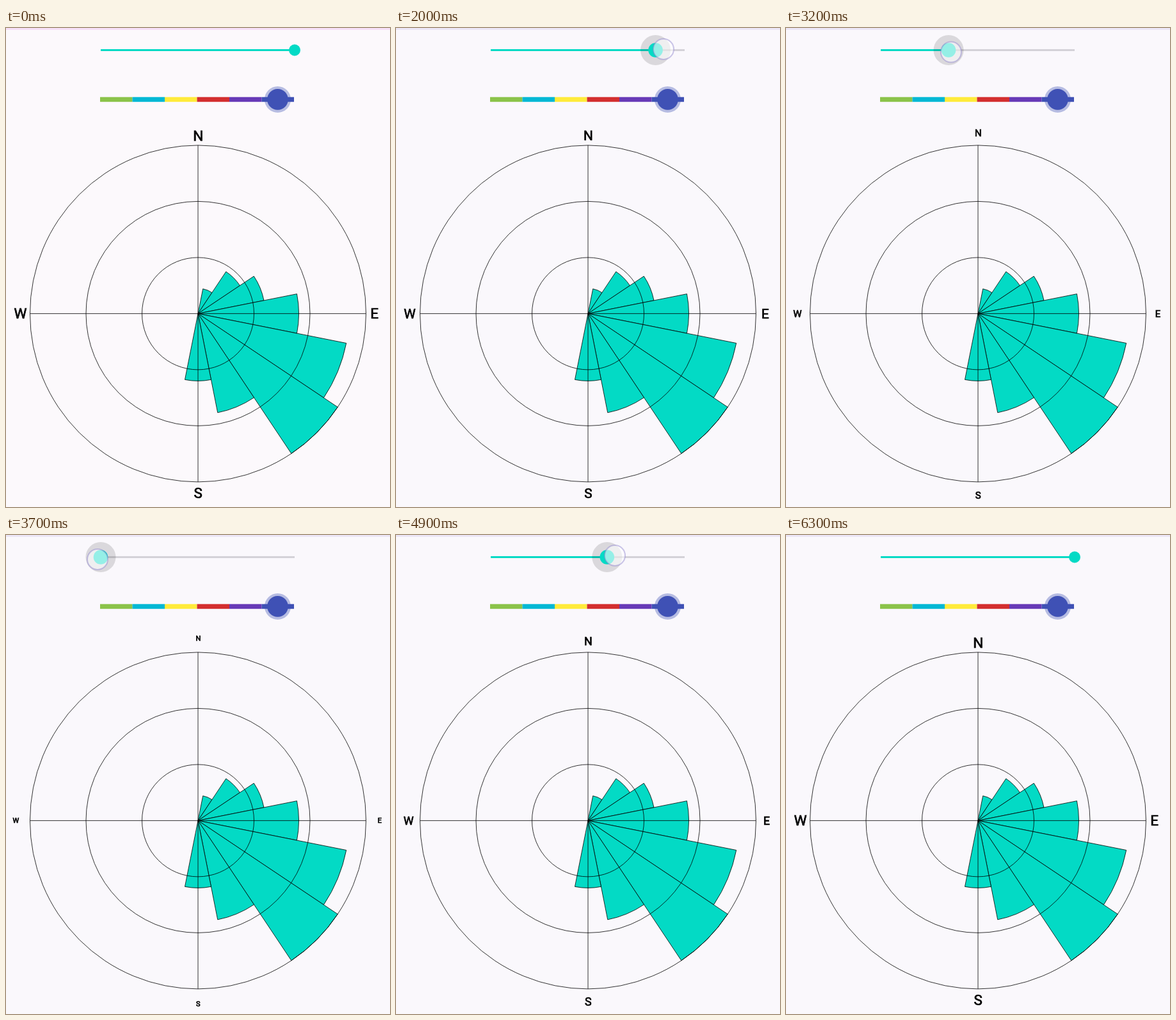
An HTML page with a canvas for the animation above (9000 ms loop, 600x747 px).

```html
<!DOCTYPE html>
<html lang="en">
<head>
<meta charset="utf-8">
<title>Wind rose</title>
<style>
html, body { margin: 0; height: 100%; overflow: hidden; background: #faf8fc; }
canvas { display: block; }
</style>
</head>
<body>
<canvas id="stage" width="600" height="747"></canvas>
<script>
const ctx = document.getElementById('stage').getContext('2d');
const LOOP = 9000, STEP = 100;
const TEAL = '#03dac5';
const CX = 300, CY = 445.4, R = 262.5;
const X0 = 148, X1 = 451, TRACK_Y = 34.5, STEPS = 20;
const SPEEDS = [0, 3, 6, 8, 12, 18, 20, 12, 8];
const COLORS = ['#8bc34a', '#00b8d4', '#ffeb3b', '#d32f2f', '#673ab7', '#3f51b5'];

// Touch pointer: time, x, y
const PATH = [
  [1400, 447, 29], [1700, 444, 30], [2300, 392, 36], [2500, 380, 37],
  [2700, 380, 37], [3650, 148, 38], [3700, 143, 38], [4100, 143, 38],
  [4900, 342, 32], [5300, 452, 22], [5600, 481.5, 16], [6200, 495, 18]
];

const clamp = v => Math.max(0, Math.min(1, v));
const lerp = (a, b, k) => a + (b - a) * k;

function pointerAt(t) {
  const i = PATH.findIndex(p => p[0] > t);
  if (i < 1) return null;
  const a = PATH[i - 1], b = PATH[i];
  const k = (t - a[0]) / (b[0] - a[0]);
  return { x: lerp(a[1], b[1], k), y: lerp(a[2], b[2], k) };
}

function disc(x, y, r, fill) {
  ctx.beginPath();
  ctx.arc(x, y, r, 0, 7);
  ctx.fillStyle = fill;
  ctx.fill();
}

function rect(x, y, w, h, fill) {
  ctx.fillStyle = fill;
  ctx.fillRect(x, y, w, h);
}

function drawRose() {
  ctx.strokeStyle = '#000';
  ctx.lineWidth = 0.8;
  const unit = Math.PI / 8;
  SPEEDS.forEach((speed, i) => {
    if (!speed) return;
    const mid = i * unit - Math.PI / 2;
    ctx.beginPath();
    ctx.moveTo(CX, CY);
    ctx.arc(CX, CY, R * speed / 20, mid - unit / 2, mid + unit / 2);
    ctx.closePath();
    ctx.fillStyle = TEAL;
    ctx.fill();
    ctx.stroke();
  });
  ctx.beginPath();
  for (const k of [1, 2, 3]) {
    const r = R * k / 3;
    ctx.moveTo(CX + r, CY);
    ctx.arc(CX, CY, r, 0, 2 * Math.PI);
  }
  ctx.moveTo(CX - R, CY);
  ctx.lineTo(CX + R, CY);
  ctx.moveTo(CX, CY - R);
  ctx.lineTo(CX, CY + R);
  ctx.stroke();
}

function drawLabels(value) {
  const size = lerp(11, 22.5, value);
  ctx.font = `${size}px Roboto, sans-serif`;
  ctx.textAlign = 'center';
  ctx.fillStyle = ctx.strokeStyle = '#000';
  ctx.lineWidth = 0.7;
  const put = (s, x, y) => {
    y += size * 0.355;
    ctx.fillText(s, x, y);
    ctx.strokeText(s, x, y);
  };
  put('N', 300.3, lerp(161, 168.5, value));
  put('S', 300.3, lerp(731, 725, value));
  put('W', lerp(15.5, 22.5, value), 445.3);
  put('E', lerp(584, 575.7, value), 445.3);
}

function drawSizeSlider(value, press) {
  const x = lerp(X0, X1, value);
  rect(X0, TRACK_Y - 1.5, X1 - X0, 3, '#d4d2d8');
  rect(X0, TRACK_Y - 1.5, x - X0, 3, TEAL);
  if (press) disc(x, TRACK_Y, 23.5 * press, `rgba(0,0,0,${0.13 * press})`);
  disc(x, TRACK_Y, lerp(9, 11.3, press), TEAL);
}

function drawColorSlider() {
  COLORS.forEach((c, i) => rect(147 + i * 50.5, 107.7, 50.5, 7.5, c));
  disc(424.5, 111.4, 20.5, 'rgba(63,81,181,.36)');
  disc(424.5, 111.4, 16.3, '#3f51b5');
}

function drawPointer(p) {
  disc(p.x, p.y, 16, 'rgba(255,255,255,.58)');
  ctx.strokeStyle = 'rgba(140,130,205,.45)';
  ctx.lineWidth = 2;
  ctx.stroke();
}

function draw(time) {
  const t = Math.floor(time % LOOP / STEP) * STEP;
  const pointer = pointerAt(t);
  const press = t < 6300 ? clamp((t - 1400) / 300) * (t < 6200 ? 1 : 0.5) : 0;
  const dragging = pointer && t >= 1700;
  const value = dragging
    ? Math.floor(clamp((pointer.x - X0) / (X1 - X0)) * STEPS) / STEPS
    : 1;
  const warm = t < 1500;
  rect(0, 0, 600, 747, warm ? '#fcf9fc' : '#faf8fc');
  rect(0, 0, 600, 3, t < 1400 ? '#f7e0f8' : '#ece6f7');
  drawRose();
  drawLabels(value);
  drawSizeSlider(value, press);
  drawColorSlider();
  if (pointer) drawPointer(pointer);
}

const start = performance.now();
function tick() {
  draw(performance.now() - start);
  requestAnimationFrame(tick);
}
tick();
</script>
</body>
</html>
```
